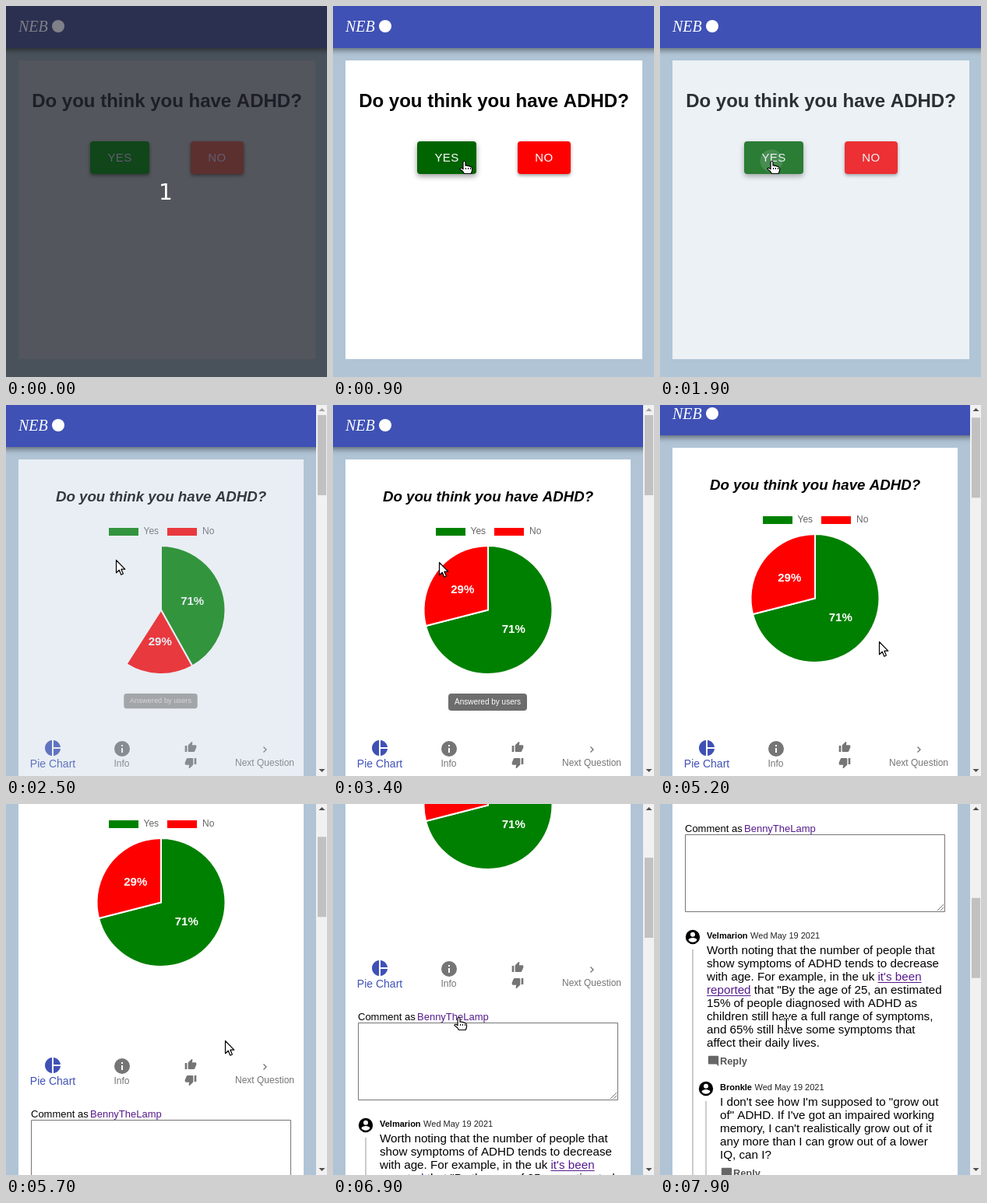
Write an HTML page with a canvas that moves like this. It is 412 px wide and 477 px high and loops after 8 s.

```html
<!DOCTYPE html>
<html lang="en">
<head>
<meta charset="utf-8">
<title>Quiz poll</title>
<style>
html, body { margin: 0; width: 100%; height: 100%; overflow: hidden; background: #b0c4d6; }
canvas { display: block; }
</style>
</head>
<body>
<canvas id="stage" width="412" height="477"></canvas>
<script>
const W = 412, H = 477, LOOP = 8000, STEP = 100;
const ctx = document.getElementById('stage').getContext('2d');
const SANS = '"Liberation Sans", Arial, sans-serif';
const SERIF = '"Liberation Serif", serif';
const QUESTION = 'Do you think you have ADHD?';
const BG = '#b0c4d6', BLUE = '#3f51b5', GREY = '#757575', LINK = '#551a8b';

const CLEAR = { head: BLUE, logo: '#fff', bg: BG, card: '#fff', title: '#000',
  yes: '#008000', no: '#ff0000', label: '#fff' };
const DIM = { head: '#2c3050', logo: '#7f8088', bg: '#49525b', card: '#53565c', title: '#1d1f27',
  yes: '#10461a', no: '#5c302e', label: '#625c72' };

const ICON = {
  pie: new Path2D('M11 2v20c-5.07-.5-9-4.79-9-10s3.93-9.5 9-10zm2.03 0v8.99H22c-.47-4.74-4.24-8.52-8.97-8.99zm0 11.01V22c4.74-.47 8.5-4.25 8.97-8.99z'),
  info: new Path2D('M12 2a10 10 0 1 0 0 20a10 10 0 1 0 0-20zM13 17h-2v-6h2zM13 9h-2V7h2z'),
  thumb: new Path2D('M1 21h4V9H1zM23 10c0-1.1-.9-2-2-2h-6.3l1-4.9c0-.4-.2-.8-.5-1L14.2 1 7.6 7.6C7.2 8 7 8.5 7 9v10c0 1.1.9 2 2 2h9c.8 0 1.5-.5 1.8-1.2l3-7c.1-.3.2-.5.2-.8z'),
  user: new Path2D('M12 1a11 11 0 1 0 0 22a11 11 0 1 0 0-22zM12 4.6a3.6 3.6 0 1 1 0 7.2a3.6 3.6 0 1 1 0-7.2zM12 20.2c-2.8 0-5.2-1.4-6.6-3.6c0-2.2 4.4-3.4 6.6-3.4s6.6 1.2 6.6 3.4c-1.4 2.2-3.8 3.6-6.6 3.6z'),
  note: new Path2D('M22 4c0-1.1-.9-2-2-2H4c-1.1 0-2 .9-2 2v12c0 1.1.9 2 2 2h14l4 4z'),
  arrow: new Path2D('M.5.5V16.8L4.3 13.2 6.8 19.2 9.4 18 6.9 12.2H11.8z'),
  hand: new Path2D('M5 2Q5 .5 6.5.5T8 2V6.2Q9.5 5.5 10.5 6.6Q12 6 13 7.2Q14.5 6.8 15.2 8Q16.5 8 16.5 10V13L15.2 16.5H6.5L4.5 13.5.8 10.6Q1.6 8.6 3.4 9.6L5 10.8z')
};

const clamp = x => Math.max(0, Math.min(1, x));
const lerp = (a, b, p) => a + (b - a) * p;
const part = (t, start, length) => clamp((t - start) / length);
const outQuart = p => 1 - (1 - p) ** 4;

// CSS "ease" curve
function ease(x) {
  let lo = 0, hi = 1, s = 0.5;
  for (let i = 0; i < 20; i++) {
    s = (lo + hi) / 2;
    const bx = 0.75 * (1 - s) * s + s ** 3;
    if (bx < x) lo = s; else hi = s;
  }
  return 0.3 * (1 - s) ** 2 * s + 3 * (1 - s) * s * s + s ** 3;
}

// Linear track through rows of [time, ...values]
function track(keys, t) {
  if (t <= keys[0][0]) return keys[0].slice(1);
  for (let i = 1; i < keys.length; i++) {
    const a = keys[i - 1], b = keys[i];
    if (t <= b[0]) return b.slice(1).map((v, j) => lerp(a[j + 1], v, (t - a[0]) / (b[0] - a[0])));
  }
  return keys[keys.length - 1].slice(1);
}

const CURSOR = [[300, 110, 5], [400, 128, 93], [500, 128, 93], [900, 168, 199], [1200, 168, 199],
  [1300, 143, 199], [2000, 143, 199], [2100, 141, 199], [2800, 141, 199], [3500, 135, 203],
  [4300, 257.5, 238], [4500, 262, 245], [5000, 281, 304], [5800, 281, 304], [6900, 161, 274],
  [7300, 162, 277]];
const SCROLL = [[5100, 0], [5200, 15], [5300, 42], [5600, 123], [5700, 137], [6300, 137], [6900, 262],
  [7300, 400], [7700, 400], [7900, 504]];

function rect(x, y, w, h, color, r = 0) {
  ctx.fillStyle = color;
  ctx.beginPath();
  ctx.roundRect(x, y, w, h, r);
  ctx.fill();
}

function text(str, x, y, font, color, align = 'left') {
  ctx.font = font;
  ctx.fillStyle = color;
  ctx.textAlign = align;
  ctx.fillText(str, x, y);
}

function sans(str, x, y, size, color, align, style = '') {
  text(str, x, y, `${style} ${size}px ${SANS}`, color, align);
}

// Icon on a 24 unit grid, centred on x, y
function icon(name, x, y, size, color, turn = 0) {
  ctx.save();
  ctx.translate(x, y);
  ctx.rotate(turn);
  ctx.scale(size / 24, size / 24);
  ctx.translate(-12, -12);
  ctx.fillStyle = color;
  ctx.fill(ICON[name], 'evenodd');
  ctx.restore();
}

function shadow(blur, dy, alpha) {
  ctx.shadowColor = `rgba(0,0,0,${alpha})`;
  ctx.shadowBlur = blur;
  ctx.shadowOffsetY = dy;
}

function header(th, width) {
  ctx.save();
  shadow(7, 3, 0.45);
  rect(-12, -10, width + 24, 64, th.head);
  ctx.restore();
  text('NEB', 16, 33, `italic 20px ${SERIF}`, th.logo);
  ctx.fillStyle = th.logo;
  ctx.beginPath();
  ctx.arc(67, 26, 8, 0, 7);
  ctx.fill();
}

function veil(opacity) {
  ctx.globalAlpha = 1 - opacity;
  rect(0, 0, W, H, BG);
  ctx.globalAlpha = 1;
}

function button(x, w, label, color, th, raised) {
  ctx.save();
  shadow(raised ? 7 : 4, raised ? 3 : 2, 0.4);
  rect(x, 174, w, 42, color, 4);
  ctx.restore();
  ctx.letterSpacing = '0.4px';
  sans(label, x + w / 2, 200, 15, th.label, 'center');
  ctx.letterSpacing = '0px';
}

function questionPage(th, t) {
  const hover = t >= 700;
  rect(0, 0, W, H, th.bg);
  rect(16, 70, 381, 384, th.card);
  sans(QUESTION, 206.5, 130, 24, th.title, 'center', 'bold');
  button(108, 76, 'YES', hover ? '#006400' : th.yes, th, hover);
  button(237, 68, 'NO', th.no, th, false);
  if (t >= 1800) {
    const p = part(t, 1740, 550);
    ctx.save();
    ctx.beginPath();
    ctx.roundRect(108, 174, 76, 42, 4);
    ctx.clip();
    ctx.fillStyle = `rgba(255,255,255,${0.1 + 0.15 * p})`;
    ctx.beginPath();
    ctx.arc(143, 199, 50 * p, 0, 7);
    ctx.fill();
    ctx.restore();
  }
  veil(1 - ease(part(t, 1815, 480)));
  header(th, W);
}

const PIE = { x: 199, y: 263.5, r: 82.5 };
const SLICES = [
  { name: 'Yes', share: 71, color: '#008000', hot: '#007400' },
  { name: 'No', share: 29, color: '#ff0000', hot: '#f20000' }
];

function hovered(t) {
  if (t >= 3700 && t < 4000) return 1;
  return t >= 4000 && t < 4800 ? 0 : -1;
}

function pieChart(t) {
  const grow = outQuart(part(t, 2300, 1000));
  const hot = hovered(t);
  let from = -Math.PI / 2;
  const labels = [];
  SLICES.forEach((s, i) => {
    const to = from + s.share / 100 * 2 * Math.PI * grow;
    const mid = (from + to) / 2;
    ctx.beginPath();
    ctx.moveTo(PIE.x, PIE.y);
    ctx.arc(PIE.x, PIE.y, PIE.r, from, to);
    ctx.closePath();
    ctx.fillStyle = i === hot ? s.hot : s.color;
    ctx.fill();
    ctx.lineWidth = 2;
    ctx.lineJoin = 'round';
    ctx.strokeStyle = '#fff';
    ctx.stroke();
    if (i === hot) {
      ctx.beginPath();
      ctx.arc(PIE.x, PIE.y, PIE.r, from, to);
      ctx.strokeStyle = '#e2e6e2';
      ctx.stroke();
    }
    labels.push([s.share + '%', PIE.x + 41.5 * Math.cos(mid), PIE.y + 41.5 * Math.sin(mid)]);
    from = to;
  });
  for (const [str, x, y] of labels) sans(str, x, y + 4, 15, '#fff', 'center', 'bold');
}

function chartTip(t) {
  const alpha = t < 4800 ? part(t, 3600, 300) : 1 - part(t, 4700, 300);
  if (alpha <= 0) return;
  const s = SLICES[t < 4000 ? 1 : 0];
  const p = outQuart(part(t, 3900, 400));
  const x = lerp(173, 148, p), y = lerp(226, 276, p);
  ctx.globalAlpha = alpha;
  rect(x, y, s.name === 'Yes' ? 77 : 72, 24, 'rgba(0,0,0,0.8)', 5);
  rect(x + 6, y + 6, 13, 13, '#fff');
  rect(x + 7.5, y + 7.5, 10, 10, s.color);
  sans(`${s.name}: ${s.share}%`, x + 20.5, y + 16, 12, '#fff');
  ctx.globalAlpha = 1;
}

function answeredTip(t) {
  const p = ease(part(t, 2300, 450));
  const alpha = p * p * (1 - part(t, 4900, 200));
  if (alpha <= 0) return;
  const s = 0.75 + 0.25 * p;
  ctx.save();
  ctx.globalAlpha = alpha;
  ctx.translate(198.5, 371);
  ctx.scale(s, s * s);
  rect(-50.5, 0, 101, 22, 'rgba(97,97,97,0.92)', 4);
  sans('Answered by users', 0, 14, 10, '#fff', 'center');
  ctx.restore();
}

function navRow(y) {
  rect(16, y - 18, 366, 54, '#fff');
  icon('pie', 60, y, 24, BLUE);
  sans('Pie Chart', 60, y + 25, 14, BLUE, 'center');
  icon('info', 149, y + 1, 24, GREY);
  sans('Info', 148.5, y + 24, 12, GREY, 'center');
  icon('thumb', 237, y - 1, 16, GREY);
  icon('thumb', 237, y + 19, 16, GREY, Math.PI);
  ctx.strokeStyle = GREY;
  ctx.lineWidth = 1.4;
  ctx.lineJoin = 'miter';
  ctx.beginPath();
  ctx.moveTo(330.5, y - 1.5);
  ctx.lineTo(334, y + 2);
  ctx.lineTo(330.5, y + 5.5);
  ctx.stroke();
  sans('Next Question', 332, y + 23, 12, GREY, 'center');
}

// Text between asterisks is a link
function richLine(line, x, y) {
  line.split('*').forEach((piece, i) => {
    const link = i % 2 === 1;
    sans(piece, x, y, 15.2, link ? LINK : '#000');
    const w = ctx.measureText(piece).width;
    if (link) rect(x, y + 2, w, 1, LINK);
    x += w;
  });
}

function comment(x, y, name, lines) {
  icon('user', x - 18, y - 2, 20, '#000');
  rect(x - 19, y + 14, 2, 700, '#ccc');
  sans(name, x, y, 11, '#000', 'left', 'bold');
  const w = ctx.measureText(name).width;
  sans('Wed May 19 2021', x + w + 3.5, y, 11, '#222');
  lines.forEach((line, i) => richLine(line, x, y + 20 + i * 17));
  const end = y + 26 + lines.length * 17 + (lines.length > 6 ? 17 : 0);
  const base = lines.length > 6 ? y + 162 : end;
  icon('note', x + 8.5, base - 4.5, 16, '#666');
  sans('Reply', x + 17, base, 12.8, '#555', 'left', 'bold');
}

function commentBox() {
  sans('Comment as ', 32, 540, 13, '#000');
  sans('BennyTheLamp', 108, 540, 13, LINK);
  ctx.strokeStyle = '#767676';
  ctx.lineWidth = 1;
  ctx.strokeRect(32.5, 543.5, 333, 99);
  ctx.beginPath();
  for (const d of [4, 8]) {
    ctx.moveTo(364 - d, 641);
    ctx.lineTo(364, 641 - d);
  }
  ctx.stroke();
}

const FIRST = ['Worth noting that the number of people that', 'show symptoms of ADHD tends to decrease',
  "with age. For example, in the uk *it's been*", '*reported* that "By the age of 25, an estimated',
  '15% of people diagnosed with ADHD as', 'children still have a full range of symptoms,',
  'and 65% still have some symptoms that', 'affect their daily lives.'];
const SECOND = ['I don\'t see how I\'m supposed to "grow out', 'of" ADHD. If I\'ve got an impaired working',
  "memory, I can't realistically grow out of it", 'any more than I can grow out of a lower', 'IQ, can I?'];

function scrollBar(scroll) {
  rect(398, 0, 14, H, '#f1f1f1');
  rect(400, 13 + scroll * 0.214, 11, 103, '#c1c1c1');
  const tri = (y, d, color) => {
    ctx.fillStyle = color;
    ctx.beginPath();
    ctx.moveTo(401.5, y);
    ctx.lineTo(409.5, y);
    ctx.lineTo(405.5, y + d);
    ctx.fill();
  };
  tri(8, -4, scroll > 0 ? '#505050' : '#a3a3a3');
  tri(468, 4, '#505050');
}

function resultPage(t) {
  const scroll = Math.round(track(SCROLL, t)[0]);
  rect(0, 0, W, H, BG);
  ctx.save();
  ctx.translate(0, -scroll);
  rect(16, 70, 366, 1200, '#fff');
  sans(QUESTION, 199, 124, 18.72, '#000', 'center', 'italic bold');
  rect(132, 158, 38, 10, '#008000');
  sans('Yes', 176.5, 166, 12, '#666');
  rect(207, 158, 38, 10, '#ff0000');
  sans('No', 252, 166, 12, '#666');
  pieChart(t);
  chartTip(t);
  commentBox();
  comment(60, 677, 'Velmarion', FIRST);
  comment(77, 872, 'Bronkle', SECOND);
  // the row sticks to the bottom edge until its own place scrolls into view
  navRow(Math.min(473, 441 + scroll));
  ctx.restore();

  veil(ease(part(t, 2290, 500)));
  ctx.save();
  ctx.translate(0, -scroll);
  header(CLEAR, 398);
  answeredTip(t);
  ctx.restore();
  scrollBar(scroll);
}

function shape(path, x, y) {
  ctx.save();
  ctx.translate(x, y);
  ctx.fillStyle = '#fff';
  ctx.fill(path);
  ctx.strokeStyle = '#000';
  ctx.lineWidth = 1.2;
  ctx.lineJoin = 'round';
  ctx.stroke(path);
  ctx.restore();
}

function beam(x, y) {
  for (const [grow, color] of [[1, '#fff'], [0, '#000']]) {
    const bar = (bx, by, w, h) => rect(bx - grow, by - grow, w + 2 * grow, h + 2 * grow, color);
    bar(x - 0.5, y - 1, 1.5, 15);
    bar(x - 3, y - 2, 2.5, 1);
    bar(x + 1, y - 2, 2.5, 1);
    bar(x - 3, y + 14, 2.5, 1);
    bar(x + 1, y + 14, 2.5, 1);
  }
}

function cursor(t) {
  const [x, y] = track(CURSOR, t).map(Math.round);
  if (t >= 7000) return beam(x, y);
  const hand = (t >= 700 && t < 2200) || t === 6900;
  if (!hand) return shape(ICON.arrow, x, y);
  shape(ICON.hand, x - 6, y);
  for (const dx of [2, 5, 8]) rect(x + dx, y + 9, 1, 2, '#000');
}

function draw(t) {
  if (t < 2300) questionPage(CLEAR, t);
  else resultPage(t);
  if (t >= 200) cursor(t);
  if (t < 200) {
    ctx.save();
    if (t < 100) {
      questionPage(DIM, t);
      text('1', 205, 249, '28px "DejaVu Sans", sans-serif', '#fff', 'center');
    } else {
      rect(0, 0, W, H, 'rgba(30,32,38,0.35)');
    }
    ctx.restore();
  }
}

function tick() {
  draw(Math.floor(performance.now() % LOOP / STEP) * STEP);
  requestAnimationFrame(tick);
}
tick();
</script>
</body>
</html>
```
